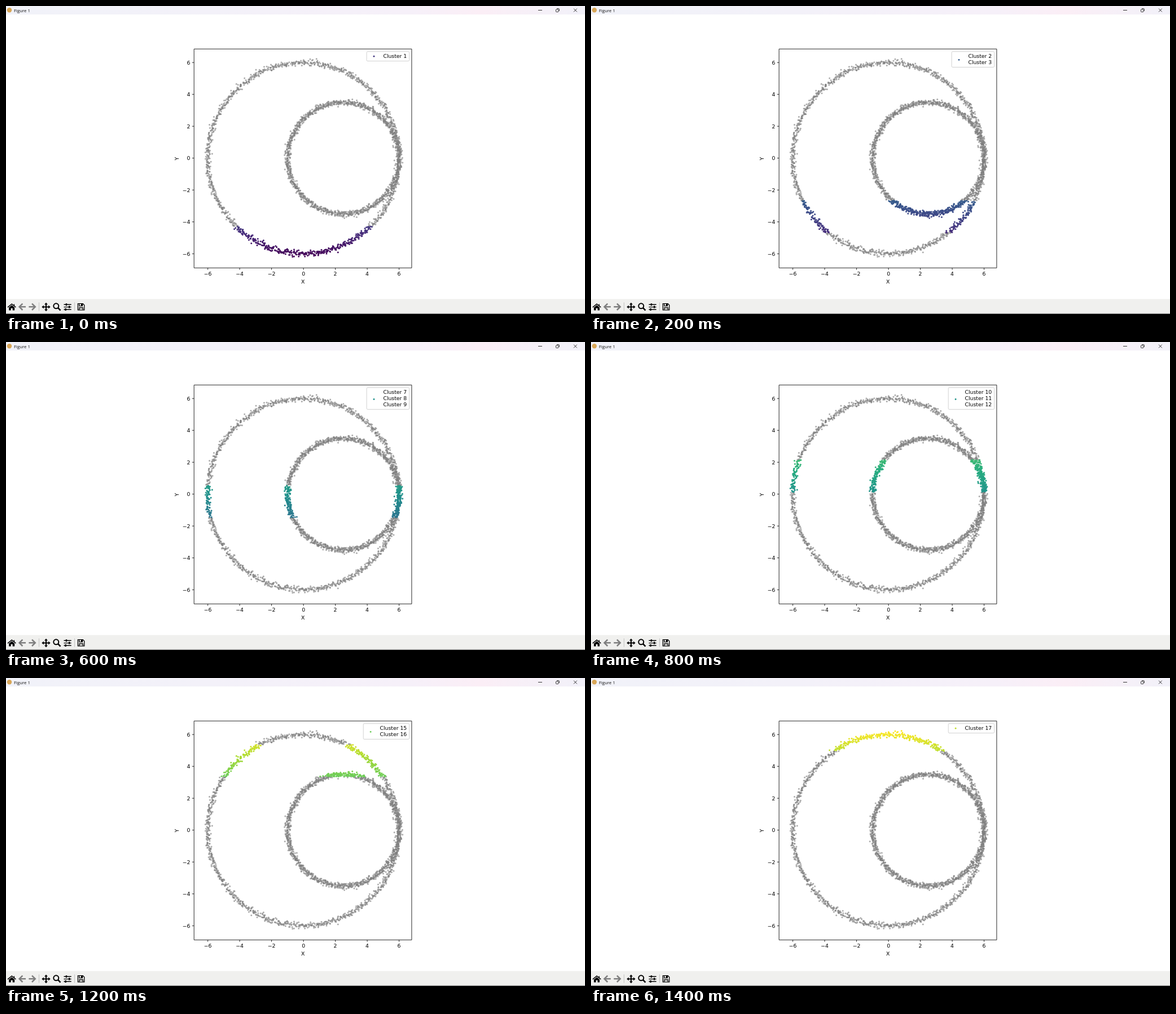
Animation, 1026 px wide and 546 px high, one loop 1600 ms. Source, as an HTML page with a canvas:

```html
<!DOCTYPE html>
<html lang="en">
<head>
<meta charset="utf-8">
<title>Figure 1</title>
<style>
html, body { margin: 0; width: 1026px; height: 546px; overflow: hidden; background: #fff; }
canvas, svg { position: absolute; left: 0; top: 0; display: block; }
.plot text { font: 9.3px "DejaVu Sans", sans-serif; fill: #000; }
.mid { text-anchor: middle; }
.end { text-anchor: end; }
.axes { fill: none; stroke: #000; stroke-width: .85; }
.icon { fill: none; stroke: #000; stroke-width: 2; }
</style>
</head>
<body>
<canvas id="dots" width="1026" height="546"></canvas>
<svg width="1026" height="546" viewBox="0 0 1026 546">
  <defs>
    <linearGradient id="bar">
      <stop offset="0" stop-color="#f1f2f9"/>
      <stop offset=".35" stop-color="#f3f1f9"/>
      <stop offset=".7" stop-color="#f6f0f9"/>
      <stop offset=".82" stop-color="#fbeef6"/>
      <stop offset=".93" stop-color="#f5f0f8"/>
      <stop offset="1" stop-color="#f2f1f9"/>
    </linearGradient>
  </defs>

  <!-- title bar -->
  <rect width="1026" height="15" fill="url(#bar)"/>
  <circle cx="6" cy="7.3" r="4.2" fill="#d8a657"/>
  <text x="14" y="10.5" font-family="Open Sans, Noto Sans, sans-serif" font-size="7.8" fill="#111">Figure 1</text>
  <g fill="none" stroke="#222" stroke-width=".9">
    <path d="M943 7.5h7M1006 4.6l5.8 5.8M1011.8 4.6l-5.8 5.8"/>
    <rect x="974.5" y="6" width="4.4" height="4.5" rx=".8"/>
    <path d="M976 4.6h3.2q1.2 0 1.2 1.2v3.2"/>
  </g>

  <!-- plot -->
  <g class="plot">
    <path class="axes" d="M333.2 76.2H718.9V464.3H333.2Z"/>
    <g id="ticks"></g>
    <text class="mid" x="526.3" y="491.8">X</text>
    <text class="mid" transform="translate(305.8 270.6) rotate(-90)">Y</text>
    <rect id="box" y="80.8" rx="1.8" fill="#fff" stroke="#ccc" stroke-width=".9"/>
    <circle id="marker" r="1.45"/>
    <g id="labels"></g>
  </g>

  <!-- toolbar -->
  <rect y="519.5" width="1026" height="26.5" fill="#f0f0ee"/>
  <path d="M0 545.4H1026" stroke="#777"/>
  <path d="M58.5 525.5v15M121.5 525.5v15" stroke="#c2c2c2"/>
  <path d="M5.2 534.4L10.2 530.2L15.2 534.4V539.6H11.7V535.8H8.7V539.6H5.2Z"/>
  <path class="icon" style="stroke-width:1.5" d="M3 534.2L10.2 528.2L17.4 534.2M14.4 528.4v3"/>
  <g class="icon" style="stroke:#7f7f7f;stroke-width:2.5">
    <path d="M29.4 527.6L23.6 533.3L29.4 539M24 533.3H35"/>
    <path d="M46 527.6L51.8 533.3L46 539M51.4 533.3H40.4"/>
  </g>
  <path class="icon" d="M71 528v11M65.5 533.5h11"/>
  <path d="M71 525.8l3 3.5h-6zM71 541.2l3-3.5h-6zM63.3 533.5l3.5-3v6zM78.7 533.5l-3.5-3v6z"/>
  <circle class="icon" cx="88.8" cy="531.8" r="4.5"/>
  <path class="icon" style="stroke-width:2.6" d="M92.2 535.2l4.3 4.4"/>
  <path class="icon" style="stroke-width:1.4" d="M102.5 529.2h13.2M102.5 533.6h13.2M102.5 538h13.2"/>
  <path class="icon" style="stroke-width:2.4" d="M107 527.2v4M112.2 531.6v4M105.6 536v4"/>
  <path class="icon" style="stroke-width:1.3" d="M127.4 527.7H136.2L138.8 530.3V538.9H127.4ZM129.8 528v3.8h5.6v-3.8M129.8 538.8v-3.8h6.6v3.8"/>
  <path d="M133 528h2.4v3.6h-2.4z"/>
</svg>
<script>
const $ = id => document.getElementById(id);
const ctx = $("dots").getContext("2d");
const STEP = 200;

const px = x => 527.1 + 28.24 * x;
const py = y => 269.7 - 28.25 * y;

// Overlapping bands of y, one for each step
const LOW = -6.28, HIGH = 6.2, STRIDE = 1.606, BAND = 2.01;
const clusters = [[1, 1], [2, 3], [4, 6], [7, 9], [10, 12], [13, 14], [15, 16], [17, 17]];

const viridis = ["440154", "472d7b", "3b528b", "2c728e", "21918c", "28ae80", "5ec962", "addc30", "fde725"]
  .map(h => [0, 2, 4].map(i => parseInt(h.slice(i, i + 2), 16)));

function colour(y) {
  const v = Math.min(1, Math.max(0, (y - LOW) / (HIGH - LOW))) * 8;
  const i = Math.min(7, Math.floor(v));
  const mix = viridis[i].map((c, k) => Math.round(c + (viridis[i + 1][k] - c) * (v - i)));
  return `rgb(${mix})`;
}

let seed = 42;
function random() {
  seed = (seed + 0x6d2b79f5) | 0;
  let t = Math.imul(seed ^ (seed >>> 15), 1 | seed);
  t = (t + Math.imul(t ^ (t >>> 7), 61 | t)) ^ t;
  return ((t ^ (t >>> 14)) >>> 0) / 4294967296;
}
const noise = () => 0.087 * Math.sqrt(-2 * Math.log(1 - random())) * Math.cos(2 * Math.PI * random());

function ring(cx, r, count) {
  return Array.from({ length: count }, (_, i) => {
    const a = 2 * Math.PI * i / count;
    return { x: cx + r * Math.cos(a) + noise(), y: r * Math.sin(a) + noise() };
  });
}
const points = [...ring(0, 6, 1500), ...ring(2.5, 3.5, 1500)];

function dot(p, fill) {
  ctx.fillStyle = fill;
  ctx.beginPath();
  ctx.arc(px(p.x), py(p.y), 1.5, 0, 2 * Math.PI);
  ctx.fill();
}

function buildTicks() {
  let path = "", text = "";
  for (let v = -6; v <= 6; v += 2) {
    const name = String(v).replace("-", "\u2212");
    path += `M${px(v)} 464.3v3.4M333.2 ${py(v)}h-3.4`;
    text += `<text class="mid" x="${px(v)}" y="478.2">${name}</text>`;
    text += `<text class="end" x="326.4" y="${py(v) + 3.5}">${name}</text>`;
  }
  $("ticks").innerHTML = `<path class="axes" d="${path}"/>${text}`;
}

function drawLegend(step, low, high) {
  const [first, last] = clusters[step];
  const rows = last - first + 1;
  const left = last > 9 ? 633.2 : 639.1;
  $("box").setAttribute("x", left);
  $("box").setAttribute("width", 714.6 - left);
  $("box").setAttribute("height", 5.9 + 10.9 * rows);
  $("marker").setAttribute("cx", left + 12.9);
  $("marker").setAttribute("cy", 89.3 + 6.1 * (rows - 1));
  $("marker").setAttribute("fill", colour(Math.min(high, Math.max(low, 0))));
  let text = "";
  for (let n = first; n <= last; n++)
    text += `<text x="${left + 29.3}" y="${92.1 + 10.9 * (n - first)}">Cluster ${n}</text>`;
  $("labels").innerHTML = text;
}

function draw(step) {
  const low = step ? LOW + STRIDE * step : -Infinity;
  const high = step < 7 ? LOW + STRIDE * step + BAND : Infinity;
  const active = p => p.y >= low && p.y <= high;
  ctx.clearRect(0, 0, 1026, 546);
  for (const p of points) if (!active(p)) dot(p, "rgba(128,128,128,.65)");
  for (const p of points) if (active(p)) dot(p, colour(p.y));
  drawLegend(step, low, high);
}

buildTicks();
let shown = 0;
draw(shown);
const start = performance.now();
function tick() {
  const step = Math.floor((performance.now() - start) / STEP) % clusters.length;
  if (step !== shown) draw(shown = step);
  requestAnimationFrame(tick);
}
requestAnimationFrame(tick);
</script>
</body>
</html>
```
